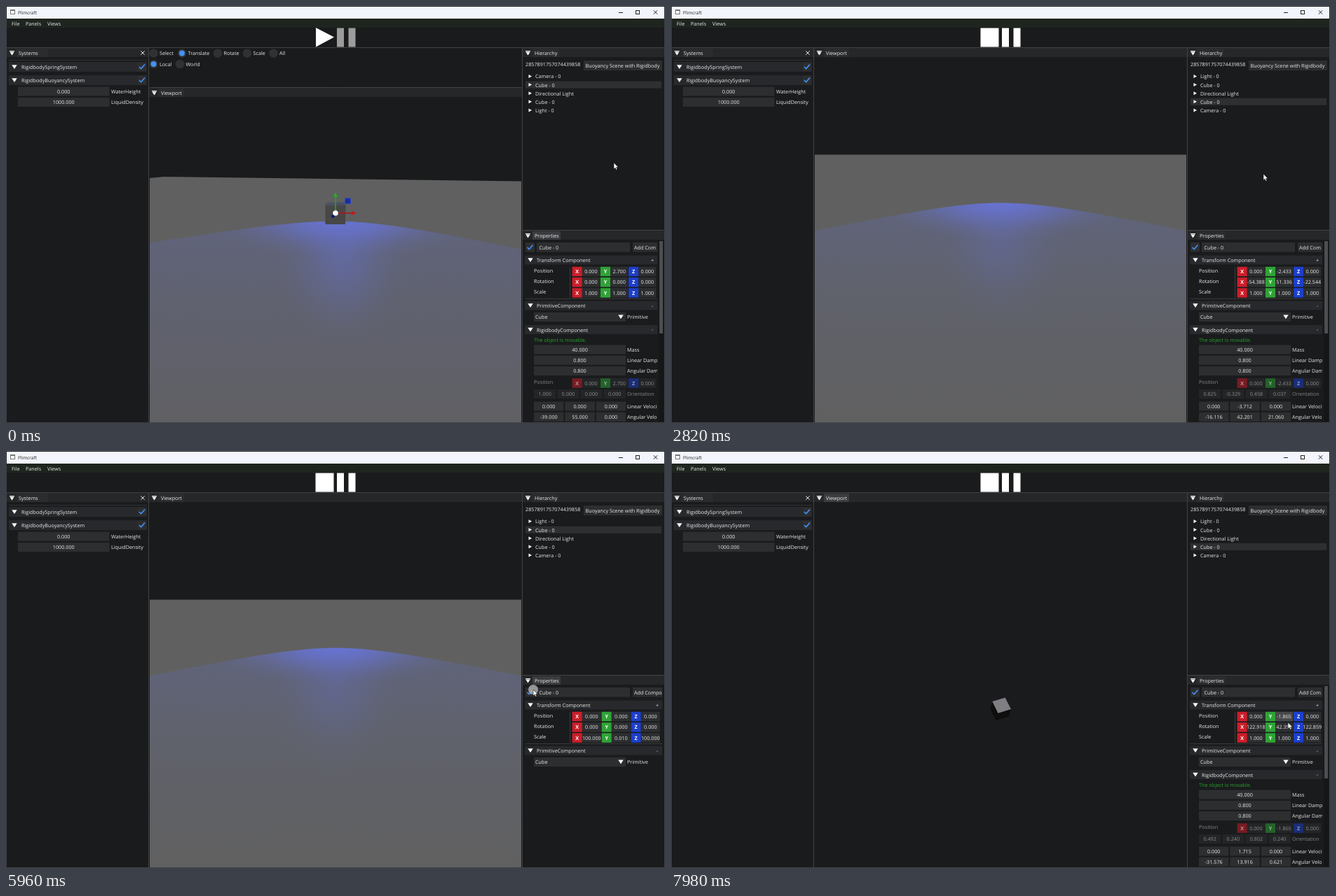
Animation of 940 by 596 pixels, one loop 8000 ms. Source, as an HTML page with a canvas:

```html
<!DOCTYPE html>
<html lang="en">
<head>
<meta charset="utf-8">
<title>Physics editor</title>
<style>
html, body { margin: 0; width: 100%; height: 100%; overflow: hidden; background: #1a1b1d; }
canvas { display: block; }
</style>
</head>
<body>
<canvas id="stage" width="940" height="596"></canvas>
<script>
const ctx = document.getElementById('stage').getContext('2d');
const LOOP = 8000, PLAY = 1560, DROP = 1588, HIDE_WATER = 6030;
const BG = '#1a1b1d', BAR = '#262729', FIELD = '#2d2e30', EDGE = '#404244', INK = '#e9e9e9', BLUE = '#4292f5';

// Pointer moves: when it leaves, when it arrives, where it rests
const moves = [
  { leave: 0, arrive: 0, at: [867, 224] },
  { leave: 600, arrive: 1300, at: [454, 41] },
  { leave: 1630, arrive: 2260, at: [845, 240] },
  { leave: 3940, arrive: 4780, at: [673, 311] },
  { leave: 4850, arrive: 5480, at: [790, 112] },
  { leave: 5750, arrive: 5960, at: [752, 341] },
  { leave: 6030, arrive: 6450, at: [845, 225] },
  { leave: 6590, arrive: 7080, at: [476, 322] },
  { leave: 7430, arrive: 7980, at: [880, 388] },
];
// A click focuses a panel when pressed and selects a row when released
const clicks = [
  { down: 0, up: 0, focus: 'props', row: 1 },
  { down: 1300, up: PLAY, focus: 'tools', row: 3 },
  { down: 4780, up: 4780, focus: 'view', row: -1 },
  { down: 5620, up: 5820, focus: 'tree', row: 1 },
  { down: 5960, up: HIDE_WATER, focus: 'props', row: 1 },
  { down: 6450, up: 6520, focus: 'tree', row: -1 },
  { down: 7220, up: 7290, focus: 'view', row: 3 },
];
// Turning points of the bobbing: [time, height]
const turns = [[DROP, 2.7], [3150, -3.1], [4630, 1.18], [5750, -2.4], [6850, .5], [7780, -2.05], [8800, -.2]];
// Tumbling poses in degrees
const poses = [[DROP, [0, 0, 0]], [2820, [-54.388, 51.336, -22.544]], [4710, [45.989, 38.706, 130.354]],
  [7080, [99.4, 14.1, 124.1]], [7980, [122.918, 42.35, 122.859]]];

const smooth = u => u * u * (3 - 2 * u);
const clamp = u => Math.min(1, Math.max(0, u));
const lerp = (a, b, u) => a.map((v, i) => v + (b[i] - v) * u);
const fixed = v => (Math.abs(v) < .0005 ? 0 : v).toFixed(3);

function between(keys, t) {
  const i = Math.max(1, keys.findIndex(k => k[0] > t));
  const [t0, a] = keys[t < keys.at(-1)[0] ? i - 1 : keys.length - 2];
  const [t1, b] = keys[t < keys.at(-1)[0] ? i : keys.length - 1];
  return { a, b, u: clamp((t - t0) / (t1 - t0)), seconds: (t1 - t0) / 1000 };
}
function pointer(t) {
  const i = moves.findLastIndex(m => t >= m.leave), m = moves[i];
  return i ? lerp(moves[i - 1].at, m.at, smooth(clamp((t - m.leave) / (m.arrive - m.leave)))) : m.at;
}
function bobbing(t) {
  const { a, b, u, seconds } = between(turns, t);
  return [a + (b - a) * smooth(u), (b - a) / seconds * 6 * u * (1 - u)];
}
function spin(t) {
  const s = Math.max(0, t - DROP) / 1000;
  return [-39 * Math.cos(.92 * s) * Math.exp(-.02 * s), 55 * Math.exp(-.215 * s), 54 * Math.sin(.48 * s) * Math.exp(-.29 * s)];
}
function toQuat(e) {
  const [cx, cy, cz] = e.map(a => Math.cos(a * Math.PI / 360)), [sx, sy, sz] = e.map(a => Math.sin(a * Math.PI / 360));
  return [cx * cy * cz + sx * sy * sz, sx * cy * cz - cx * sy * sz, cx * sy * cz + sx * cy * sz, cx * cy * sz - sx * sy * cz];
}
function orientation(t) {
  const { a, b, u } = between(poses, t), q = lerp(toQuat(a), toQuat(b), u), n = Math.hypot(...q);
  return q.map(v => v / n);
}
// Rotated x, y and z axes
function axes([w, x, y, z]) {
  return [[1 - 2 * (y * y + z * z), 2 * (x * y + w * z), 2 * (x * z - w * y)],
    [2 * (x * y - w * z), 1 - 2 * (x * x + z * z), 2 * (y * z + w * x)],
    [2 * (x * z + w * y), 2 * (y * z - w * x), 1 - 2 * (x * x + y * y)]];
}
function eulers([X, Y, Z]) {
  return [Math.atan2(Y[2], Z[2]), Math.asin(-X[2]), Math.atan2(X[1], X[0])].map(a => a * 180 / Math.PI);
}

function rect(x0, y0, x1, y1, color) {
  ctx.fillStyle = color;
  ctx.fillRect(x0, y0, x1 - x0, y1 - y0);
}
function poly(points, color) {
  ctx.beginPath();
  points.forEach(p => ctx.lineTo(p[0], p[1]));
  ctx.closePath();
  ctx.fillStyle = color;
  ctx.fill();
}
function line(x0, y0, x1, y1, color, width = 1) {
  ctx.beginPath();
  ctx.moveTo(x0, y0);
  ctx.lineTo(x1, y1);
  ctx.strokeStyle = color;
  ctx.lineWidth = width;
  ctx.stroke();
}
function disc(x, y, r, color) {
  ctx.beginPath();
  ctx.arc(x, y, r, 0, 7);
  ctx.fillStyle = color;
  ctx.fill();
}
function text(s, x, y, align = 'left', color = INK, font = '7.23px') {
  ctx.font = font + ' "Open Sans", "Noto Sans", sans-serif';
  ctx.textAlign = align;
  ctx.fillStyle = color;
  ctx.fillText(s, x, y + 2.6);
}
function check(x, y) {
  line(x - 4, y, x - 1, y + 3, BLUE, 1.7);
  line(x - 1.6, y + 3, x + 4, y - 3.5, BLUE, 1.7);
}
const arrowDown = (x, y, r = 3.7) => poly([[x - r, y - r * .75], [x + r, y - r * .75], [x, y + r * .8]], '#fff');
const arrowRight = (x, y) => poly([[x - 2, y - 2.5], [x + 2.5, y], [x - 2, y + 2.5]], '#fff');
function cross(x, y, r, color) {
  line(x - r, y - r, x + r, y + r, color);
  line(x - r, y + r, x + r, y - r, color);
}
function field(x0, x1, y, value) {
  rect(x0, y - 6.5, x1, y + 6.5, FIELD);
  text(value, (x0 + x1) / 2, y, 'center');
}
function panelBar(x0, x1, y, name, tabEnd, focused) {
  rect(x0, y, x1, y + 13, BAR);
  rect(x0 + 14, y + 1, tabEnd, y + 13, focused ? '#3b3c3f' : '#2b2c2e');
  line(x0 + 4, y + 4.5, x0 + 11, y + 4.5, '#fff');
  arrowDown(x0 + 7.5, y + 8, 3.2);
  text(name, x0 + 17, y + 7);
}

function drawFrame(playing) {
  rect(0, 0, 940, 596, BG);
  rect(0, 0, 940, 18, '#20242c');
  rect(1, 1, 939, 18, '#f2f5fb');
  rect(6, 5, 13, 12, '#777');
  rect(7, 7, 12, 11, '#fff');
  text('Plimcraft', 17, 9, 'left', '#222', '6.5px');
  line(874, 9.5, 880, 9.5, '#222');
  ctx.strokeRect(898.5, 6.5, 5, 5);
  cross(926.5, 9, 2.7, '#222');
  rect(1, 18, 939, 31, '#1e251f');
  text('File', 8, 25);
  text('Panels', 28, 25);
  text('Views', 59, 25);
  if (playing) rect(441.5, 31.5, 467.5, 58.5, '#fff');
  else poly([[442, 31], [468, 44.5], [442, 58.5]], '#fff');
  for (const x of [472, 488.5]) rect(x, 31.5, x + 10, 58.5, playing ? '#fff' : '#9c9c9c');
}

function drawSystems() {
  panelBar(1, 203, 60, 'Systems', 60);
  cross(195, 67, 2.7, INK);
  ['RigidbodySpringSystem', 'RigidbodyBuoyancySystem'].forEach((name, i) => {
    const y = 87 + 19 * i;
    rect(4, y - 7, 201, y + 7, '#28292c');
    arrowDown(12, y);
    text(name, 22, y + .5);
    rect(188, y - 6, 200, y + 6, FIELD);
    check(194, y);
  });
  line(4, 77.5, 201, 77.5, '#303133');
  field(17, 147.5, 122, '0.000');
  text('WaterHeight', 150, 122);
  field(17, 147.5, 137.5, '1000.000');
  text('LiquidDensity', 150, 137.5);
}

function drawTools() {
  const radio = (x, y, s, on) => {
    disc(x, y, 6.3, '#303133');
    if (on) disc(x, y, 4, BLUE);
    text(s, x + 8.5, y);
  };
  radio(210.5, 67.5, 'Select');
  radio(251, 67.5, 'Translate', true);
  radio(302, 67.5, 'Rotate');
  radio(344, 67.5, 'Scale');
  radio(381.5, 67.5, 'All');
  radio(210.5, 83, 'Local', true);
  radio(248, 83, 'World');
  line(205, 116.5, 736, 116.5, EDGE);
}

function glow(x, y, rx, ry, rgb, alpha) {
  ctx.save();
  ctx.translate(x, y);
  ctx.scale(rx, ry);
  const g = ctx.createRadialGradient(0, 0, 0, 0, 0, 1);
  for (let p = 0; p <= 1; p += .125) g.addColorStop(p, `rgba(${rgb},${alpha * (1 - smooth(p)) * (1 - p / 2)})`);
  ctx.fillStyle = g;
  ctx.fillRect(-1, -1, 2, 2);
  ctx.restore();
}
function drawWater(playing) {
  const far = playing ? [[205, 212.5], [735, 212.5]] : [[205, 246], [225, 244], [735, 250.5]];
  poly([...far, [735, 595], [205, 595]], '#606060');
  const [px, py, slope, tilt] = playing ? [470, 281.5, .2135, 0] : [480, 308, .195, .0245];
  ctx.save();
  ctx.beginPath();
  for (let x = 205; x <= 735; x += 5) {
    const dx = x - px;
    ctx.lineTo(x, py + Math.hypot(20, slope * dx) - 20 + tilt * dx);
  }
  ctx.lineTo(735, 595);
  ctx.lineTo(205, 595);
  ctx.clip();
  const g = ctx.createLinearGradient(0, py, 0, 595);
  g.addColorStop(0, '#60647c');
  g.addColorStop(.4, playing ? '#60626c' : '#606270');
  g.addColorStop(1, playing ? '#606060' : '#606064');
  rect(205, py, 735, 595, g);
  glow(px, py, 200, 55, '106,120,238', .78);
  glow(px, py + 40, 100, 150, '100,112,200', playing ? .32 : .5);
  ctx.restore();
}

const FOCAL = 640, DIST = 31, TILT = 17 * Math.PI / 180, SIN = Math.sin(TILT), COS = Math.cos(TILT);
function project([x, y, z]) {
  const k = FOCAL / (DIST - y * SIN - z * COS);
  return [470 + x * k, 332.5 - (y * COS - z * SIN) * k];
}
function clipBelow(points) {
  return points.flatMap((a, i) => {
    const b = points[(i + 1) % points.length], out = a[1] >= 0 ? [a] : [];
    if (a[1] >= 0 !== b[1] >= 0) out.push(lerp(a, b, a[1] / (a[1] - b[1])));
    return out;
  });
}
function drawCube(height, basis, clipped) {
  for (let i = 0; i < 3; i++) for (const sign of [-1, 1]) {
    const n = basis[i].map(v => v * sign), u = basis[(i + 1) % 3], v = basis[(i + 2) % 3];
    const center = [n[0] / 2, height + n[1] / 2, n[2] / 2];
    const facing = -n[0] * center[0] + n[1] * (DIST * SIN - center[1]) + n[2] * (DIST * COS - center[2]);
    if (facing <= 0) continue;
    let face = [[-1, -1], [1, -1], [1, 1], [-1, 1]].map(([a, b]) => center.map((c, j) => c + (a * u[j] + b * v[j]) / 2));
    if (clipped) face = clipBelow(face);
    if (!face.length) continue;
    const shade = Math.max(14, 104 * n[1] + 70 * n[2] + 20 * n[0]);
    poly(face.map(project), `rgb(${shade},${shade},${shade + 35 * n[1] ** 8})`);
  }
}
function drawEditCube() {
  poly([[455, 284], [459, 280.5], [483, 280.5], [485, 285], [484, 312], [455, 311]], '#4c5064');
  rect(456, 285, 484, 312, '#474747');
  line(470, 296, 470, 273, '#22a022', 1.8);
  poly([[467, 273], [473, 273], [470, 266]], '#22b022');
  line(470, 296, 493, 296, '#a81c1c', 1.8);
  poly([[493, 293], [493, 299], [500, 296]], '#b81c1c');
  line(470, 296, 465, 302, '#0a1670', 4);
  rect(483, 274.5, 492, 283, '#1c2c92');
  ctx.lineWidth = 1;
  ctx.strokeStyle = '#2d48c8';
  ctx.strokeRect(483.5, 275, 8, 7.5);
  disc(470, 296, 3.8, '#fff');
}

function drawHierarchy(playing, selected, focused) {
  panelBar(737, 939, 60, 'Hierarchy', 789, focused);
  text('2857891757074439858', 741, 83.5);
  rect(824, 78, 936, 92, FIELD);
  text('Buoyancy Scene with Rigidbody', 879.5, 85, 'center');
  const names = ['Camera - 0', 'Cube - 0', 'Directional Light', 'Cube - 0', 'Light - 0'];
  if (playing) names.reverse();
  names.forEach((name, i) => {
    const y = 100.5 + 12.1 * i;
    if (i === selected) rect(741, y - 5, 935, y + 5, '#2e2f31');
    arrowRight(747.5, y);
    text(name, 755, y + .3);
  });
}

function vectorRow(label, y, values, wide, mouse) {
  text(label, 753, y - 1.2);
  const step = wide ? 42 : 40.2;
  ['#cc1e2a', '#2fa336', '#1c3fcc'].forEach((color, i) => {
    const x = 807.6 + step * i, end = x + step - .8;
    const hover = mouse && mouse[0] > x + 14 && mouse[0] < end && Math.abs(mouse[1] - y) < 10;
    rect(x, y - 6.8, x + 14.2, y + 6.8, color);
    text('XYZ'[i], x + 7.1, y, 'center', '#fff', 'bold 7.23px');
    rect(x + 14.2, y - 6.8, end, y + 6.8, hover ? '#48494b' : FIELD);
    text(values[i], (x + 14.2 + end) / 2, y, 'center');
  });
}
function componentHeader(name, y, end, mark) {
  rect(740, y - 6.5, end, y + 6.5, '#28292c');
  arrowDown(748, y);
  text(name, 757, y + .4);
  text(mark, end - 7, y, 'center');
}
function drawRigidbody(t, position, quat, velocity) {
  componentHeader('RigidbodyComponent', 462.5, 929, '-');
  text('The object is movable.', 753, 477.3, 'left', '#2aa52e');
  ['Mass', 'Linear Damping', 'Angular Damping'].forEach((label, i) => {
    field(753, 884, 491 + 15.3 * i, i ? '0.800' : '40.000');
    text(label, 886, 491 + 15.3 * i);
  });
  const fields = (values, y, label, step) => {
    values.forEach((v, i) => field(753 + step * i, 751 + step * (i + 1), y, fixed(v)));
    text(label, 886, y);
  };
  ctx.globalAlpha = .52;
  vectorRow('Position', 539, position);
  fields(quat, 554.5, 'Orientation', 33.2);
  ctx.globalAlpha = 1;
  fields([0, velocity, 0], 572, 'Linear Velocity', 44.4);
  fields(spin(t), 587.3, 'Angular Velocity', 44.4);
}
function drawProperties(t, selected, playing, focused, mouse) {
  panelBar(737, 939, 321, 'Properties', 791, focused);
  if (selected < 0) return text('No entity selected.', 741, 344);
  const ground = playing && selected === 1, end = ground ? 936 : 929;
  const [height, velocity] = bobbing(t), quat = orientation(t);
  const position = [0, ground ? 0 : height, 0].map(fixed);
  const rotation = (ground ? [0, 0, 0] : eulers(axes(quat))).map(fixed);
  const scale = (ground ? [100, .01, 100] : [1, 1, 1]).map(fixed);
  ctx.save();
  ctx.beginPath();
  ctx.rect(737, 334, end - 737, 261);
  ctx.clip();
  rect(741, 338, 754, 351.5, FIELD);
  if (!ground || t < HIDE_WATER) check(747.5, 345);
  rect(757, 338, 890, 351.5, FIELD);
  text('Cube - 0', 760.5, 345);
  rect(894, 338, 940, 351.5, FIELD);
  text(ground ? 'Add Compo' : 'Add Com', 896, 345);
  componentHeader('Transform Component', 363, end, '+');
  vectorRow('Position', 379.5, position, ground, mouse);
  vectorRow('Rotation', 394.8, rotation, ground);
  vectorRow('Scale', 410, scale, ground);
  line(804.5, 373, 804.5, 417, '#3a3b3d');
  line(741, 418.5, end, 418.5, '#3a3b3d');
  componentHeader('PrimitiveComponent', 428, end, '-');
  rect(753, 438, 884, 451, FIELD);
  text('Cube', 755, 444.5);
  arrowDown(877, 444.3);
  text('Primitive', 886, 444.5);
  if (!ground) drawRigidbody(t, position, quat, velocity);
  ctx.restore();
  if (!ground) {
    rect(931, 335, 938, 594, '#151617');
    rect(932, 336, 937, 468, '#4d4e50');
  }
}

function drawCursor(x, y, pressed) {
  if (pressed) disc(x, y, 7, 'rgba(190,190,190,.75)');
  ctx.save();
  ctx.translate(x, y);
  poly([[0, 0], [0, 9], [2, 7.2], [3.4, 10.2], [4.9, 9.5], [3.6, 6.6], [6.4, 6.4]], '#fff');
  ctx.strokeStyle = '#111';
  ctx.lineWidth = .6;
  ctx.stroke();
  ctx.restore();
}

function recordedTime(t) {
  const step = (start, end) => Math.min(end, start + 70 * Math.floor((t - start) / 70));
  if (t < 670) return 0;
  if (t < 1500) return step(670, 1300);
  if (t < PLAY) return 1500;
  if (t < 5820) return step(PLAY, 5620);
  return t < 7980 ? step(5820, 7920) : 7980;
}

function draw(clock) {
  const t = recordedTime(clock), playing = t >= PLAY, water = t < HIDE_WATER;
  const pressed = clicks.findLast(c => t >= c.down), focus = pressed.focus;
  const selected = clicks.findLast(c => t >= c.up).row, mouse = pointer(t);

  drawFrame(playing);
  drawSystems();
  if (!playing) drawTools();
  if (water) drawWater(playing);
  if (playing) drawCube(bobbing(t)[0], axes(orientation(t)), water);
  else drawEditCube();
  panelBar(204, 736, playing ? 60 : 117, 'Viewport', 254, focus === 'view');
  drawHierarchy(playing, selected, focus === 'tree');
  drawProperties(t, selected, playing, focus === 'props', mouse);
  for (const y of [59.5, 595.5]) line(0, y, 940, y, EDGE);
  for (const x of [203.5, 736.5]) line(x, 60, x, 595, EDGE);
  for (const x of [.5, 939.5]) line(x, 18, x, 596, EDGE);
  line(737, 320.5, 939, 320.5, EDGE);
  drawCursor(...mouse, t < pressed.up);
}

ctx.textRendering = 'geometricPrecision';
const start = performance.now();
function tick() {
  draw((performance.now() - start) % LOOP);
  requestAnimationFrame(tick);
}
tick();
</script>
</body>
</html>
```
